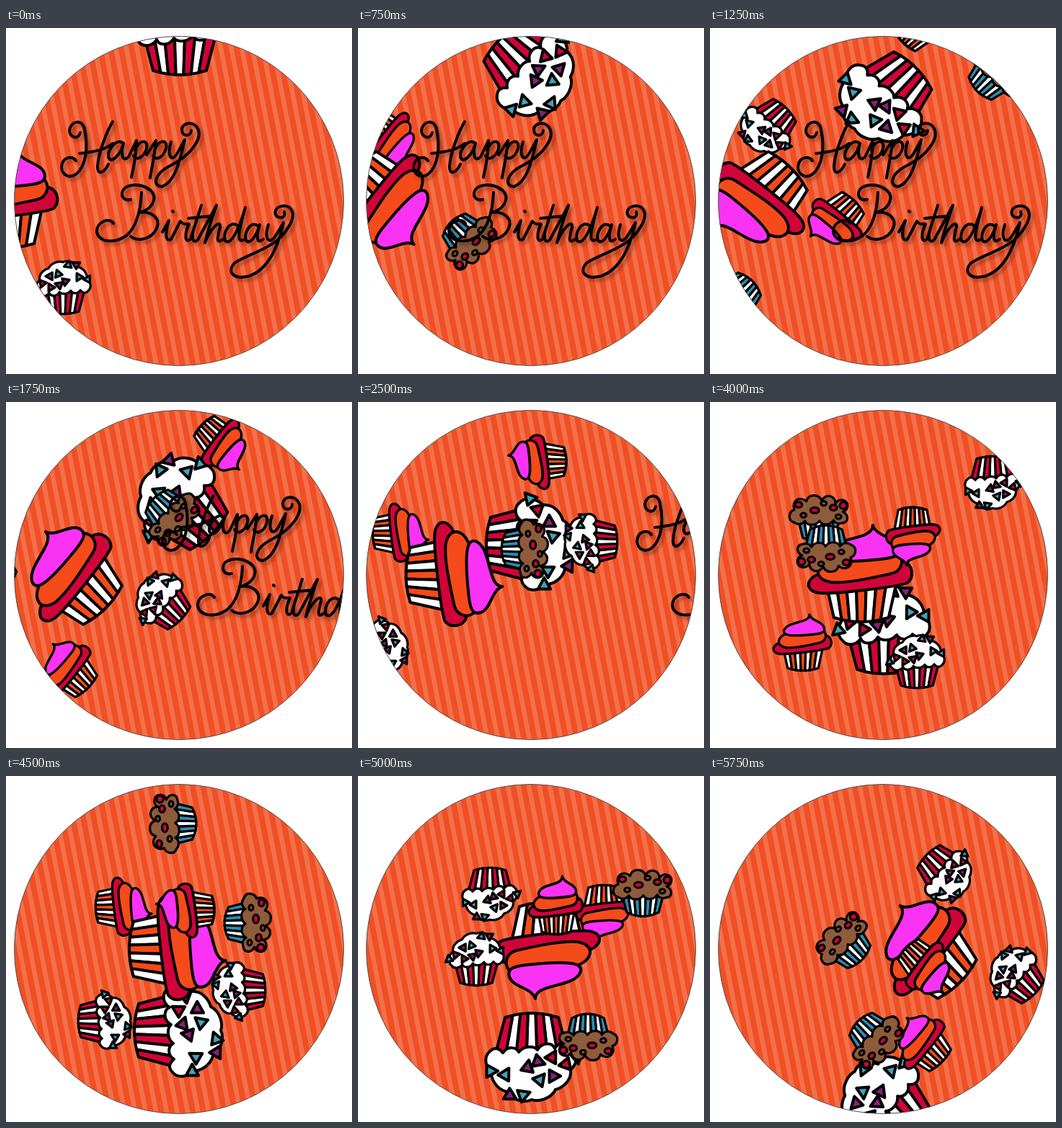
Write an HTML page with a canvas that moves like this. It is 480 px wide and 480 px high and loops after 6 s.

```html
<!DOCTYPE html>
<html lang="en">
<head>
<meta charset="utf-8">
<title>Happy Birthday</title>
<style>
  html, body { margin: 0; width: 100%; height: 100%; overflow: hidden; background: #fff; }
  canvas { display: block; width: 100vw; height: 100vh; }
</style>
</head>
<body>
<canvas id="stage" width="480" height="480" role="img" aria-label="Happy Birthday"></canvas>
<script>
const ctx = document.getElementById('stage').getContext('2d');
const LOOP = 6000, STEP = 250, TURN = 180; // ms, ms, degrees per second
const ORANGE = '#f54a1a', CRIMSON = '#cf0438', PINK = '#f932f4', WHITE = '#fff',
      TEAL = '#2a8db4', AQUA = '#3fa3b8', PURPLE = '#87207c', BROWN = '#8e5b3b', BLACK = '#000';
const rad = deg => deg * Math.PI / 180;
const lerp = (a, b, k) => a + (b - a) * k;

const lettering = new Path2D([
  // Happy
  'M103 145C101 156 88 152 88 142C89 130 106 124 109 141C114 164 112 191 97 203C85 211 74 200 78 188C81 179 92 177 97 184',
  'M148 130C139 145 128 174 127 192C127 206 137 200 142 189M102 174C121 172 138 169 148 160',
  'M163 160C154 152 141 168 142 179C146 190 159 175 163 160C159 174 161 187 170 179L181 156C181 173 177 194 174 207',
  'M179 170C184 154 198 154 195 167C191 181 180 184 177 177M195 176L208 156C207 174 202 194 200 208',
  'M206 170C211 154 225 154 222 167C218 181 207 184 204 177',
  'M229 158C223 176 229 187 237 175L248 155C242 181 235 214 216 220C202 219 207 202 226 192C255 178 271 156 267 142C262 127 243 131 244 142C245 152 257 150 257 142',
  // Birthday
  'M149 271C143 262 126 269 126 282C127 297 150 300 167 288C182 275 187 250 188 228',
  'M173 238C159 241 157 225 168 220C187 213 209 225 205 239C202 251 190 255 184 256C204 253 216 266 208 280C201 293 183 297 173 289',
  'M217 283L226 267C221 282 220 298 229 293L242 268C246 274 250 271 254 272C248 284 247 300 256 293L271 246',
  'M263 271C257 286 257 301 266 294L292 246M253 264L283 261M292 246C285 266 279 285 276 298C284 277 298 265 297 276C294 288 290 302 301 293',
  'M321 274C311 266 300 284 304 295C311 302 322 284 332 249C325 275 318 299 329 294',
  'M350 275C340 266 329 284 333 295C340 301 348 286 352 273C347 288 347 301 357 293',
  'M364 273C358 291 364 301 373 290L385 270C379 297 366 334 338 344C315 350 306 338 317 326C340 311 375 306 392 276C404 257 396 245 383 247C370 249 371 263 381 263C387 263 387 258 386 255',
  'M231 254L232 255'
].join(''));

const textShift = [0, 0, 0, 0, 22, 45, 90, 140, 195, 252, 310];

function piece(path, fill) {
  const shape = new Path2D(path);
  ctx.fillStyle = fill;
  ctx.fill(shape);
  ctx.stroke(shape);
}

function wrapper(topHalf, top, bottomHalf, bottom, colors, count) {
  const sag = x => bottom + 6 * (1 - (x / bottomHalf) ** 2);
  for (let i = 0; i < count; i++) {
    const [a, b] = [i / count, (i + 1) / count];
    const [x0, x1] = [lerp(-bottomHalf, bottomHalf, a), lerp(-bottomHalf, bottomHalf, b)];
    piece(`M${lerp(-topHalf, topHalf, a)} ${top}L${lerp(-topHalf, topHalf, b)} ${top}
      L${x1} ${sag(x1)}L${x0} ${sag(x0)}Z`, colors[i % 2]);
  }
}

function swirl() {
  wrapper(49, 10, 38, 59, [WHITE, ORANGE], 7);
  piece('M-68 4C-58 -8 42 -22 58 -19C72 -15 74 3 64 11C48 17 -40 27 -58 25C-74 23 -77 12 -68 4Z', CRIMSON);
  piece('M-56 -14C-38 -34 40 -40 52 -30C61 -19 55 -5 42 -2C14 4 -20 12 -42 10C-60 7 -64 -4 -56 -14Z', ORANGE);
  piece('M16 -69C20 -54 47 -53 52 -39C56 -27 46 -24 28 -22C0 -19 -30 -17 -42 -22C-54 -28 -44 -41 -28 -46C-8 -53 16 -54 16 -69Z', PINK);
}

const sprinkles = [ // x, y, angle, colour
  [-63, 3, 40, AQUA], [-48, -8, 130, CRIMSON], [-30, -24, 80, PURPLE], [-28, 2, 20, CRIMSON],
  [-11, -29, 30, AQUA], [-9, -4, 100, PURPLE], [6, -12, 0, PURPLE], [12, -50, 60, AQUA],
  [30, -51, 110, PURPLE], [37, -22, 20, AQUA], [57, -17, 80, AQUA]
];

function sprinkled() {
  wrapper(51, 4, 37, 57, [CRIMSON, WHITE], 7);
  piece(`M-57 17C-68 8 -61 -10 -54 -15C-56 -32 -41 -41 -33 -43C-26 -57 -8 -60 0 -57
    C12 -63 30 -55 35 -46C50 -42 57 -27 56 -17C67 -8 65 4 58 10C50 18 43 12 40 8
    C33 18 22 16 18 9C10 19 -4 17 -8 12C-15 24 -29 22 -32 14C-39 25 -52 24 -57 17Z`, WHITE);
  for (const [x, y, angle, color] of sprinkles) {
    ctx.save();
    ctx.translate(x, y);
    ctx.rotate(rad(angle));
    piece('M-8 -7L9 -4L-2 10Z', color);
    ctx.restore();
  }
}

function chocolate() {
  wrapper(30, 0, 23, 28, [TEAL, WHITE], 7);
  piece(`M-36 6C-46 2 -42 -10 -35 -12C-40 -25 -27 -32 -18 -24C-15 -35 0 -35 4 -25
    C11 -36 23 -32 24 -21C28 -29 42 -27 41 -17C40 -10 35 -9 34 -9C44 -4 42 6 34 7C28 9 23 7 21 3
    C15 12 4 10 1 4C-5 12 -17 11 -20 4C-24 10 -31 10 -36 6Z`, BROWN);
  const blob = (x, y, rx, ry, fill) =>
    piece(`M${x - rx} ${y}a${rx} ${ry} 0 1 0 ${2 * rx} 0a${rx} ${ry} 0 1 0 ${-2 * rx} 0Z`, fill);
  blob(35, -18, 5, 5, CRIMSON);
  blob(-6, -11, 6, 4, CRIMSON);
  blob(-29, -19, 5, 4, CRIMSON);
  blob(21, -15, 5, 4, CRIMSON);
  blob(-22, -4, 4, 3, BROWN);
  blob(7, -21, 4, 3, BROWN);
  blob(28, -2, 4, 3, BROWN);
}

function cake(draw, x, y, angle, width, height, line) {
  ctx.save();
  ctx.translate(x, y);
  ctx.rotate(rad(angle));
  ctx.scale(width, height);
  ctx.lineWidth = line / width;
  draw();
  ctx.restore();
}

// Small cakes circle rigidly around a shared pivot: [drawing, dx, dy, width, height]
function ring(cakes, x, y, angle) {
  const c = Math.cos(rad(angle)), s = Math.sin(rad(angle));
  for (const [draw, dx, dy, width, height] of cakes)
    cake(draw, x + dx * c - dy * s, y + dx * s + dy * c, angle, width, height, 3.2);
}
const leftRing = [[swirl, -80, 73, .56, .58], [sprinkled, 78, 97, .6, .6], [chocolate, -58, -101, .97, .97]];
const topRing = [[swirl, -3, -28, .52, .6], [sprinkled, -114, 44, .6, .6], [chocolate, 117, -47, .97, .97]];

function background() {
  ctx.fillStyle = '#f04f23';
  ctx.fillRect(0, 0, 480, 480);
  ctx.save();
  ctx.translate(240, 240);
  ctx.rotate(rad(-11));
  ctx.fillStyle = '#f3704b';
  for (let x = -292; x < 320; x += 14.3) ctx.fillRect(x, -320, 6.5, 640);
  ctx.restore();
}

function greeting(shift) {
  ctx.save();
  ctx.translate(shift, 0);
  ctx.lineWidth = 4;
  ctx.shadowColor = 'rgba(60,20,10,.4)';
  ctx.shadowBlur = 4;
  ctx.shadowOffsetX = ctx.shadowOffsetY = 4;
  ctx.stroke(lettering);
  ctx.restore();
}

function render(now) {
  const step = Math.floor(now % LOOP / STEP), t = step * STEP / 1000, angle = t * TURN;
  ctx.fillStyle = WHITE;
  ctx.fillRect(0, 0, 480, 480);
  const disc = new Path2D();
  disc.arc(240, 240, 228.5, 0, 2 * Math.PI);
  ctx.save();
  ctx.clip(disc);
  background();
  ctx.lineJoin = ctx.lineCap = 'round';
  ctx.strokeStyle = BLACK;
  cake(sprinkled, 241, 2 + 78 * t, angle, 1, 1, 4);
  ring(leftRing, 1 + 52 * t, 262, angle);
  cake(swirl, 1 + 52.2 * t, 240, angle, 1, 1, 4);
  if (t >= 1) ring(topRing, 278, 2 + 51.7 * (t - 1), angle + 180);
  if (step < textShift.length) greeting(textShift[step]);
  ctx.restore();
  ctx.lineWidth = 1;
  ctx.strokeStyle = '#555';
  ctx.stroke(disc);
}

const start = performance.now();
(function tick() {
  render(performance.now() - start);
  requestAnimationFrame(tick);
})();
</script>
</body>
</html>
```
